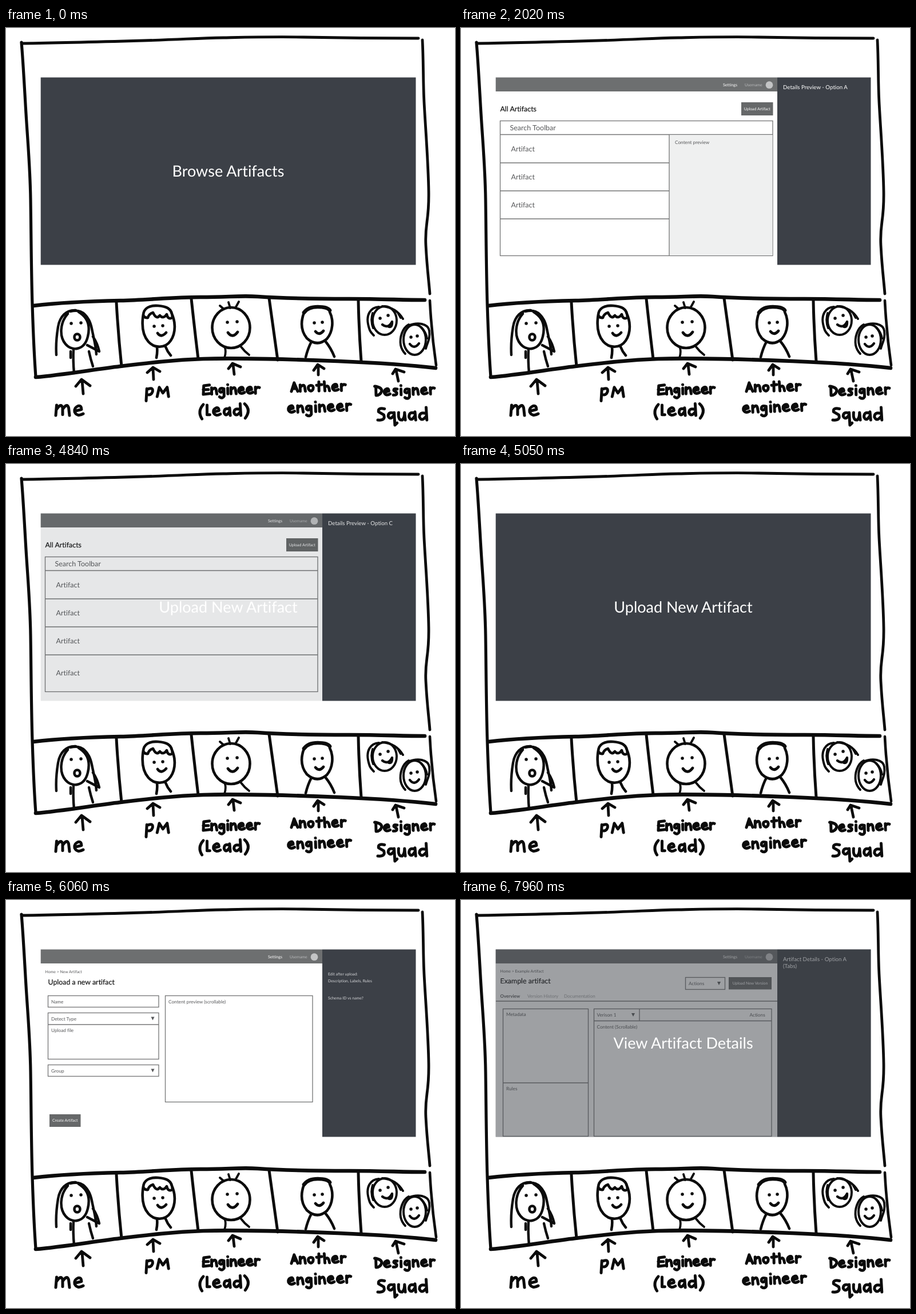
Recreate the animation shown at these times as an HTML page. Size 785 px wide and 714 px high, loop 7.99 s.

```html
<!DOCTYPE html>
<html lang="en">
<head>
<meta charset="utf-8">
<title>Design review call</title>
<style>
html, body { margin: 0; width: 100%; height: 100%; overflow: hidden; background: #fff; }
svg { display: block; width: 785px; height: 714px; }
text { font-family: Lato, Inter, sans-serif; font-variant-ligatures: none; text-rendering: geometricPrecision; white-space: pre; }
.ink path, .ink ellipse { fill: none; stroke: #0b0b0b; stroke-linecap: round; stroke-linejoin: round; vector-effect: non-scaling-stroke; }
.ink .dot { stroke-width: 5.4; }
</style>
</head>
<body>
<svg viewBox="0 0 785 714">
  <defs><clipPath id="screen"><rect x="60.7" y="86.6" width="655.8" height="327.8"/></clipPath></defs>
  <g id="slides" clip-path="url(#screen)"></g>

  <g class="ink" stroke-width="5">
    <!-- window -->
    <g stroke-width="4.8">
      <path d="M29 27C100 26 170 24 240 22S330 18 380 17S470 15 520 16S640 18 721 18"/>
      <path d="M728 21C730 60 729 90 731 130S738 230 739 285S732 340 734 380S739 440 741 465"/>
      <path stroke-width="5.2" d="M27 25C30 60 32 100 35 150S42 240 43 300S44 420 46 484S49 570 52 610"/>
    </g>
    <g stroke-width="6.6">
      <path d="M48 486C90 481 150 478 200 477S290 471 340 471S410 468 440 470S540 474 600 474S690 476 732 476"/>
      <path d="M52 611C100 607 150 598 200 592S290 581 345 579S510 580 580 583S700 589 751 595"/>
    </g>
    <path d="M193 480Q196 535 202 592M324 474Q330 530 336 579M460 473Q468 530 475 581M616 477Q617 530 621 583"/>
    <path stroke-width="4.6" d="M741 477Q744 535 752 590"/>

    <!-- me -->
    <path stroke-width="4.4" d="M122 494C105 493 94 505 91 523S87 555 88 572M113 496C134 490 146 506 150 526S157 555 158 571M108 500C94 516 93 540 104 553S137 565 143 540S138 504 127 497M142 555L163 566Q160 552 152 540"/>
    <path stroke-width="4.4" d="M118 562Q117 582 119 604M113 566L113 577M145 566Q148 580 152 592"/>
    <ellipse cx="124.5" cy="541" rx="5" ry="5.5" stroke-width="4.6"/>
    <path class="dot" d="M114 517h.1M131 516h.1"/>

    <!-- pm -->
    <path stroke-width="4.6" d="M240 501C237 520 239 538 249 549S278 562 288 547S296 512 289 498M240 505C239 489 253 485 266 486S291 490 291 507Q283 511 281 501Q275 510 269 503Q263 511 257 498Q250 500 248 507Q243 508 240 503M264 559Q265 567 263 577M279 558Q282 566 288 573"/>
    <path stroke-width="4.8" d="M265 534Q271 543 280 533"/>
    <path class="dot" d="M259 522h.1M274 521h.1"/>

    <!-- lead -->
    <ellipse cx="393.5" cy="524.5" rx="33" ry="35.5" stroke-width="4.6"/>
    <path stroke-width="3.8" d="M374 486L381 492M389 480L392 490M407 479L401 490M383 560Q385 568 382 577M411 558Q417 566 425 572"/>
    <path stroke-width="4.8" d="M388 533Q396 544 405 532"/>
    <path class="dot" d="M387 515h.1M404 514h.1"/>

    <!-- engineer -->
    <path stroke-width="4.6" d="M521 498C514 517 517 532 526 543Q544 559 561 544C572 531 573 511 566 497M534 549Q528 560 524 576M559 549Q568 560 574 575"/>
    <path stroke-width="6.6" d="M521 498Q528 488 545 488T566 494"/>
    <path stroke-width="4.8" d="M541 531Q548 539 555 530"/>
    <path class="dot" d="M539 516h.1M553 515h.1"/>

    <!-- squad -->
    <g stroke-width="3.9">
      <ellipse cx="662" cy="512" rx="21" ry="25"/>
      <path d="M652 488C636 489 630 503 633 518S639 533 643 538M658 487Q682 489 694 509M685 498L690 507M641 499Q637 513 642 525"/>
      <path stroke-width="4.4" d="M658 519Q668 527 675 514M668 522Q675 526 675 515"/>
      <ellipse cx="714.5" cy="545.5" rx="19.5" ry="26.5"/>
      <path d="M704 519C693 525 688 541 690 555Q692 564 698 570M703 521C720 514 738 517 740 530S737 550 734 561M726 524Q734 532 736 543"/>
      <path stroke-width="4.4" d="M706 553Q714 563 722 552"/>
    </g>
    <path class="dot" d="M654 508h.1M668 503h.1M708 541h.1M719 539h.1"/>

    <!-- arrows -->
    <path stroke-width="4.8" d="M133 617L135 640M122 627L132 615L147 626M257 596L258 615M247 603L257 594L269 601M397 589L399 606M389 596L396 587L410 593M546 591V607M538 599L545 589L556 596M682 599L686 618M676 605L681 597L696 602"/>
  </g>
  <g id="labels" class="ink" stroke-width="5"></g>
</svg>

<script>
const DARK = '#3c4047', BAR = '#6d6f70', LINE = '#747576', GREY = '#57585a', PALE = '#d5d6d9';

// Slide building blocks
const text = (x, y, s, size, fill = GREY, extra = '') =>
  `<text x="${x}" y="${y}" font-size="${size}" fill="${fill}" ${extra}>${s}</text>`;
const fill = (x, y, w, h, c) => `<rect x="${x}" y="${y}" width="${w}" height="${h}" fill="${c}"/>`;
const box = (x, y, w, h) =>
  `<rect x="${x}" y="${y}" width="${w}" height="${h}" fill="#fff" stroke="${LINE}" stroke-width="1.3"/>`;
const rule = d => `<path d="${d}" fill="none" stroke="${LINE}" stroke-width="1.3"/>`;
const caret = (x, y) => `<path d="M${x - 3} ${y - 3}h6l-3 6z" fill="${GREY}"/>`;
const label = (x, y, s, c) => text(x, y, s, 8.25, c);
const small = (x, y, s, c, extra) => text(x, y, s, 6.9, c, extra);
const middle = (x, y, s, c) => small(x, y, s, c, 'text-anchor="middle"');
const head = (x, y, s) => text(x, y, s, 12.4, '#151515', 'stroke="#151515" stroke-width=".2"');
const row = (y, s = 'Artifact', x = 87.5) => text(x, y, s, 12.5);
const note = (y, s) => text(563, y, s, 9.7, '#fff');
const hint = (y, s) => small(563, y, s, PALE);
const button = (x, y, w, h, s) => fill(x, y, w, h, '#666869') + middle(x + w / 2, y + h / 2 + 2.4, s, '#fff');

const cover = s => fill(60, 86, 658, 330, DARK) + text(388.5, 259.5, s, 27, '#fff', 'text-anchor="middle"');
const page = (...parts) =>
  fill(60, 86, 658, 330, '#fff') + fill(60, 86, 493, 25, BAR) + fill(553, 86, 165, 330, DARK) +
  text(458, 102, 'Settings', 7.1, '#fff') + small(496, 102, 'Username', '#b9babb') +
  `<circle cx="539" cy="99.7" r="6.4" fill="#c3c4c5"/>` + parts.join('');
const allArtifacts = (...parts) => page(
  head(68.5, 146, 'All Artifacts'), button(490, 130, 55.5, 23, 'Upload Artifact'),
  box(68.5, 162.5, 476.5, 236), rule('M68.5 186.5H545'), row(178.5, 'Search Toolbar', 85.5), ...parts);

const slides = [
  cover('Browse Artifacts'),
  page(
    label(68, 130, 'All Artifacts'), label(127, 130, 'Group 1'), label(171, 130, 'Group 2'), label(217, 130, 'Group 3'),
    rule('M125 135H156'), head(68.5, 155, 'Group 1'),
    box(426.5, 139.5, 56, 19), middle(454.5, 151.5, 'New Group'),
    button(489, 139, 56, 19.5, 'Upload Artifact'),
    box(68.5, 166.5, 476.5, 51), label(73.5, 179.5, 'Group description and actions'),
    box(68.5, 228.5, 476.5, 200), rule('M68.5 253.5H545M68.5 302.5H545M68.5 351.5H545M68.5 401H545'),
    row(245, 'Search Toolbar', 85.5), row(282), row(331), row(380.5),
    note(107, 'Artifact List - Organization'),
    hint(136, 'Multiple registries / “groups” listed in'), hint(148, 'tertiary  nav'),
    note(291.5, 'Alternatives'), hint(310, 'Dropdown to select group (if many groups)'),
    hint(329.5, 'Favorites feature (use toolbar to filter for ‘only'), hint(341, 'favorites’)')),
  allArtifacts(
    rule('M68.5 236H364M68.5 285H364M68.5 334H364'), row(215.5), row(264.5), row(313.5),
    fill(364, 187, 180.5, 211, '#eff0f0'), rule('M364 186.5V398.5'), label(374, 203, 'Content preview'),
    note(107, 'Details Preview - Option A')),
  allArtifacts(
    fill(197, 236, 347.5, 113, '#eff0f0'), fill(364, 241, 176, 20, '#fff'),
    rule('M68.5 236H545M68.5 349.5H545M196.5 236V349.5M68.5 261.5H196.5M68.5 287.5H196.5'),
    row(215.5), row(378.5),
    text(74, 249, 'Version 1', 8), text(74, 275, 'Version 2', 8),
    label(210, 254, 'Content preview'), label(369, 254, 'Actions'),
    note(107, 'Details Preview - Option B'), note(118.5, '(expandable list item)')),
  allArtifacts(
    rule('M68.5 236H545M68.5 285H545M68.5 334H545'), row(215.5), row(264.5), row(313.5), row(370),
    note(107, 'Details Preview - Option C')),
  cover('Upload New Artifact'),
  page(
    small(68.5, 127.5, 'Home &gt; New Artifact'), head(73.5, 148, 'Upload a new artifact'),
    box(73.5, 167.5, 193.5, 20), label(79, 180.5, 'Name'),
    box(73.5, 197.5, 193.5, 81), rule('M73.5 218H267'), label(79, 210.7, 'Detect Type'), caret(256.5, 207.5),
    label(79, 231, 'Upload file'),
    box(73.5, 288.5, 193.5, 20), label(79, 301.5, 'Group'), caret(256.5, 298.5),
    box(278.5, 167.5, 257.5, 186), label(284, 180.5, 'Content preview (scrollable)'),
    button(76, 375, 54.5, 22, 'Create Artifact'),
    hint(131.5, 'Edit after upload:'), hint(143.5, 'Description, Labels, Rules'), hint(174, 'Schema ID vs name?')),
  cover('View Artifact Details'),
  page(
    small(68.5, 127, 'Home &gt; Example Artifact'), head(68.5, 146, 'Example artifact'),
    box(392.5, 135.5, 69, 21), label(398, 149, 'Actions'), caret(451, 146),
    button(468, 135, 75, 21.5, 'Upload New Version'),
    text(68.5, 170.5, 'Overview', 8, GREY, 'font-weight="700"'),
    text(116, 170.5, 'Version History', 8, '#a0a1a2'), text(180, 170.5, 'Documentation', 8, '#a0a1a2'),
    rule('M61 177H553'),
    box(73.5, 190.5, 149, 223), rule('M73.5 320H222.5'), label(79, 203, 'Metadata'), label(79, 333, 'Rules'),
    box(232.5, 190.5, 310.5, 223), rule('M232.5 211.5H543M312 190.5V211.5'),
    label(237.5, 203.5, 'Verison 1'), caret(301, 201), label(504.5, 203.5, 'Actions'),
    label(237.5, 225, 'Content (Scrollable)'),
    note(107, 'Artifact Details - Option A'), note(118.5, '(Tabs)'))
];

// Marker lettering: [advance, strokes], baseline at 0
const pen = {
  a: [9, 'M8 -9Q0 -12 0 -4Q3 3 8 -6M8 -11L9 0'],
  d: [10, 'M8 -9Q0 -11 0 -4Q3 3 9 -5M9 -17L10 0'],
  e: [10, 'M0 -5L8 -7Q8 -12 4 -11Q-1 -9 0 -4Q3 2 10 -2'],
  g: [9, 'M8 -9Q0 -12 0 -5Q3 0 8 -8V4Q5 9 0 5'],
  h: [9, 'M0 -16L1 0M1 -6Q7 -13 9 0'],
  i: [2, 'M1 -10V0M1 -16h.1'],
  l: [4, 'M0 -15V-1L4 -1'],
  m: [16, 'M0 0L1 -12M1 -7Q6 -15 8 -9V-1M8 -7Q13 -15 15 -9L16 0'],
  n: [9, 'M0 0V-11M0 -7Q7 -14 8 -7L9 0'],
  o: [9, 'M4 -10Q-1 -9 0 -4Q4 3 8 -3Q10 -10 4 -10Z'],
  p: [9, 'M1 -11L0 6M1 -10Q10 -14 9 -7Q7 -1 1 -3'],
  q: [9, 'M8 -9Q0 -12 0 -5Q3 1 8 -7M8 -10L9 7L12 4'],
  r: [7, 'M0 0V-11M0 -7Q3 -12 7 -10'],
  s: [7, 'M7 -10Q1 -12 1 -8L6 -4Q7 1 0 0'],
  t: [8, 'M4 -16V0M0 -10L9 -11'],
  u: [9, 'M0 -10Q-1 1 5 0Q8 -3 8 -10L9 0'],
  A: [10, 'M0 0L5 -15L11 0M2 -5H9'],
  D: [10, 'M1 -16V0M-1 -16Q12 -14 11 -7Q8 0 1 0'],
  E: [10, 'M11 -16L1 -15L0 0L11 -1M0 -8H9'],
  M: [16, 'M0 0L3 -13L8 -5L14 -13L16 0'],
  S: [9, 'M9 -15Q0 -17 1 -11L8 -7Q11 1 0 0'],
  '(': [5, 'M5 -16Q-4 -6 3 5'],
  ')': [5, 'M0 -17Q10 -8 1 4']
};
function write(word, x, y, gap, scale = 1, tilt = 0) {
  let out = '', at = 0;
  for (const c of word) {
    const [w, d] = pen[c];
    out += `<path transform="translate(${at}) scale(${scale})" d="${d}"/>`;
    at += w * scale + gap;
  }
  return `<g aria-label="${word}" transform="translate(${x} ${y}) rotate(${tilt})">${out}</g>`;
}
document.getElementById('labels').innerHTML = [
  write('me', 87, 678, 9, 1.5),
  write('pM', 245, 645, 8, 1.25),
  write('Engineer', 345, 641, 4.6, 1, -1),
  write('(lead)', 339, 678, 6.5, 1.2),
  write('Another', 499, 636, 5.4, 1, -1),
  write('engineer', 494, 673, 5.7, 1.05, -2),
  write('Designer', 646, 643, 5.6, 1, -1.5),
  write('Squad', 650, 686, 6.5, 1.3)
].join('');

const stage = document.getElementById('slides');
stage.innerHTML = slides.map(s => `<g>${s}</g>`).join('');
const layers = [...stage.children];

// Each slide holds, then the next one fades in over it in equal steps
const LOOP = 7990, PERIOD = 1010, HOLD = 800, STEP = 30, STEPS = 8;
function show(t) {
  const i = Math.floor(t / PERIOD), local = t - i * PERIOD;
  const mix = local < HOLD ? 0 : (Math.floor((local - HOLD) / STEP) + 1) / STEPS;
  layers.forEach((g, n) => {
    const o = n === i ? 1 : n === i + 1 ? mix : 0;
    g.style.display = o ? '' : 'none';
    g.style.opacity = o;
  });
}
const start = performance.now();
function tick(now) {
  show(Math.max(0, now - start) % LOOP);
  requestAnimationFrame(tick);
}
show(0);
requestAnimationFrame(tick);
</script>
</body>
</html>
```
